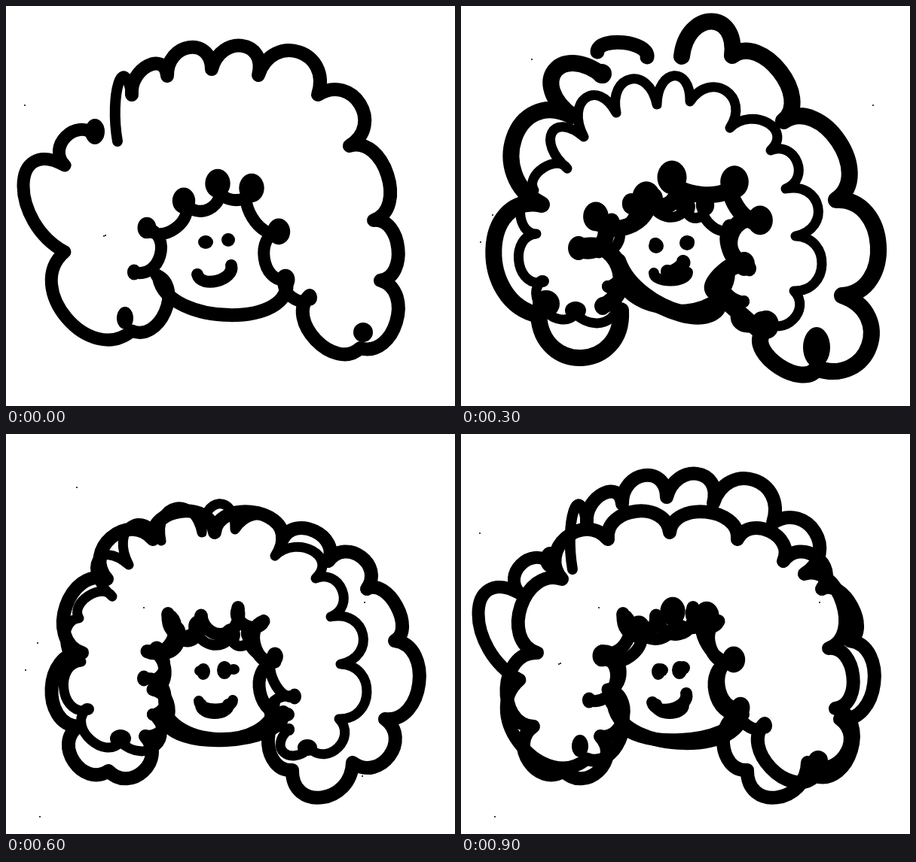
Animation, 596 px wide and 532 px high, one loop 1 s. Source, as an HTML page with a canvas:

```html
<!DOCTYPE html>
<html lang="en">
<head>
<meta charset="utf-8">
<title>Curly hair</title>
<style>
  html, body { margin: 0; height: 100%; overflow: hidden; background: #fff; }
  canvas { display: block; }
</style>
</head>
<body>
<canvas id="stage" width="596" height="532"></canvas>
<script>
const ctx = document.getElementById('stage').getContext('2d');
ctx.lineCap = ctx.lineJoin = 'round';

// Chain of arcs between cusps "x,y,bulge,lean". A positive bulge lies to the
// left of the stroke; lean slides the arc's top along its chord.
function curls(width, text) {
  const cusps = text.split(' ').map(p => p.split(',').map(Number));
  ctx.lineWidth = width;
  ctx.beginPath();
  cusps.forEach(([x, y, bulge = 0, lean = 0], i) => {
    if (!i) return ctx.moveTo(x, y);
    const [px, py] = cusps[i - 1];
    const dx = x - px, dy = y - py;
    const push = bulge * 4 / 3 / Math.hypot(dx, dy);
    const cx = dy * push + dx * lean, cy = -dx * push + dy * lean;
    ctx.bezierCurveTo(px + cx, py + cy, x + cx, y + cy, x, y);
  });
  ctx.stroke();
  return cusps;
}

function blob(x, y, rx, ry = rx) {
  ctx.beginPath();
  ctx.ellipse(x, y, rx, ry, 0, 0, 7);
  ctx.fill();
}

// Curls around the face, with knobs at the cusps that grow towards the forehead.
function fringe(width, knob, text) {
  curls(width, text).forEach(([x, y], i, all) => {
    const r = knob * (.7 + .6 * Math.sin(Math.PI * i / (all.length - 1)));
    blob(x, y, r, r * 1.15);
  });
}

const specks = (...spots) => spots.forEach(([x, y]) => blob(x, y, 1));

const heads = {
  A() {
    curls(17, '200,358 167,432,30 78,327,55 78,212,55,.35 118,172,26');
    curls(14, '148,180 167,120,22,.9');
    curls(18, '167,118 214,93,24,.25 273,84,33,.1 335,92,36,.1 414,118,46 456,186,41 488,285,36 497,365,28 470,455,36 403,385,35');
    fringe(16, 13, '170,354 187,295,-27 236,259,-23 281,236,-25 326,242,-19 362,300,-20 371,364,-24 404,388,-14');
    curls(18, '203,362 372,364,-48,.08');
    curls(16, '254,357 299,345,-15');
    blob(118, 167, 13, 17);
    blob(158, 415, 11, 15);
    blob(474, 434, 13);
    blob(265, 314, 10, 9);
    blob(295, 311, 9);
    specks([25, 132], [130, 306], [132, 305]);
  },
  B() {
    curls(22, '293,67 360,66,46,.12 428,153,37 498,258,46 506,385,52 472,482,56 400,435,25 335,378');
    curls(22, '212,405 103,411,60 107,264,62,.1 147,146,63,.1 188,92,54');
    curls(19, '181,61 247,68,16');
    fringe(22, 15, '188,399 156,322,-40 179,280,-25 246,255,-27 280,228,-26 363,234,-20 397,285,-16 376,343,-30 335,378,-10');
    curls(23, '208,340 340,375,-45,.3');
    curls(18, '274,353 295,340,-4');
    blob(187, 90, 13);
    blob(113, 396, 18);
    blob(405, 424, 17, 19);
    blob(472, 454, 18, 27);
    blob(259, 319, 10);
    blob(300, 315, 10);
    specks([547, 132]);
  },
  C() {
    curls(13, '194,373 152,410,35,-.1 105,368,24 100,303,26 97,245,20 141,216,18 163,174,40,.25 206,142,40,.15 260,131,40 304,127,36,.12 357,162,38 411,192,30,.2 431,243,27 444,306,37 442,379,36 403,418,26 375,393,27,.1');
    fringe(14, 10, '194,373 183,325,-24 200,288,-19 226,263,-16 255,256,-17 298,267,-19 324,265,-16 357,296,-14 383,349,-16 376,393,-30');
    curls(14, '209,350 357,356,-51');
    curls(14, '256,355 301,354,-11');
    blob(108, 366, 9, 8);
    blob(152, 405, 14, 12);
    blob(400, 417, 13, 11);
    blob(258, 315, 8, 7);
    blob(302, 313, 8, 7);
    specks([94, 71], [42, 278], [26, 314], [473, 455]);
  },
  D() {
    curls(18, '185,402 136,448,32 96,389,31 101,291,38 134,193,40 195,140,38 277,131,33 367,140,32 428,169,28 479,206,30 516,275,24 503,379,39 460,437,34 380,447,41,.1 374,373,29');
    fringe(17, 7, '185,402 195,340,-26 187,289,-20 215,240,-22 259,243,-28 308,232,-29 342,249,-16 357,303,-20 372,372,-28');
    curls(18, '212,378 368,370,-33');
    curls(16, '259,360 295,360,-11');
    blob(262, 316, 9, 11);
    blob(290, 314, 10, 12);
    specks([183, 231], [45, 509], [476, 224]);
  }
};

// Start time in ms and the heads visible from then on.
const cues = [[0, 'A'], [200, 'B'], [300, 'BC'], [400, 'C'], [600, 'CD'], [700, 'D'], [900, 'DA']];

function frame() {
  const t = performance.now() % 1000;
  const shown = cues.filter(cue => cue[0] <= t).pop()[1];
  ctx.fillStyle = '#fff';
  ctx.fillRect(0, 0, 596, 532);
  ctx.fillStyle = ctx.strokeStyle = '#000';
  for (const name of shown) heads[name]();
  requestAnimationFrame(frame);
}
frame();
</script>
</body>
</html>
```
